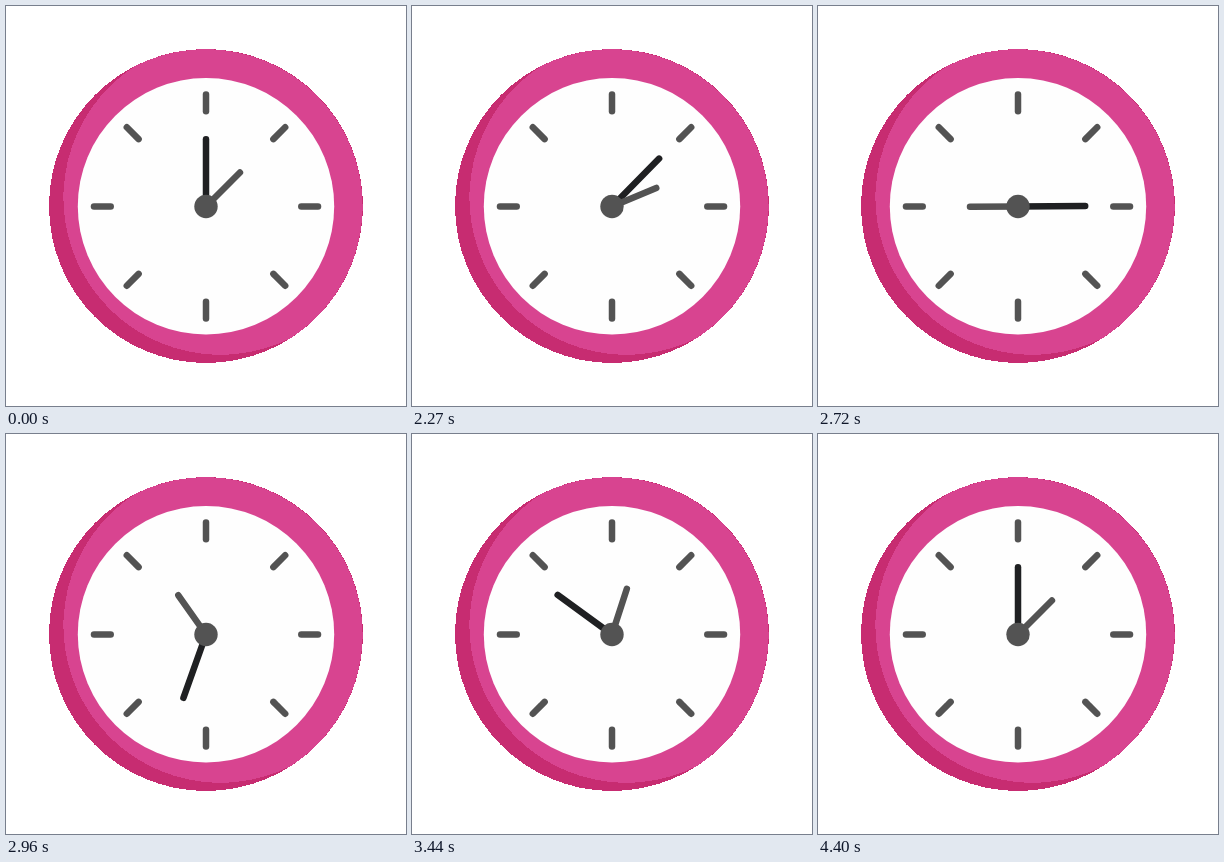
An HTML page that plays this animation: 400 by 400 pixels, repeating every 4.43 s.

```html
<!DOCTYPE html>
<html lang="en">
<head>
<meta charset="utf-8">
<title>Clock</title>
<style>
  html, body { margin: 0; width: 100%; height: 100%; overflow: hidden; background: #fff; }
  svg { display: block; width: 100%; height: 100%; }
  .bar { stroke-width: 6.5; stroke-linecap: round; }
</style>
</head>
<body>
<svg viewBox="0 0 400 400">
  <g shape-rendering="crispEdges">
    <circle cx="200" cy="200" r="157" fill="#c72c71"/>
    <path d="M129.2 59.9A157 157 0 0 1 284.8 332.1A157 157 0 0 1 129.2 59.9Z" fill="#d84490"/>
  </g>
  <circle cx="200" cy="200.3" r="128.2" fill="#fefefe"/>
  <g transform="translate(200 200.5)">
    <g id="ticks" class="bar" stroke="#535353"></g>
    <line id="minute" class="bar" y2="-67.2" stroke="#1f2022"/>
    <line id="hour" class="bar" y2="-48" stroke="#535353"/>
    <circle r="11.7" fill="#535353"/>
  </g>
</svg>
<script>
const LOOP = 4430, HOLD = 2030, STEP = 30, STEPS = 80;
const byId = id => document.getElementById(id);
const rotate = (node, deg) => node.setAttribute('transform', `rotate(${deg})`);

for (let deg = 0; deg < 360; deg += 45) {
  const tick = document.createElementNS('http://www.w3.org/2000/svg', 'line');
  tick.setAttribute('y1', -112);
  tick.setAttribute('y2', -95.3);
  rotate(tick, deg);
  byId('ticks').append(tick);
}

// cubic-bezier(1/3, 0, 0, 1), solved by bisection
function ease(x) {
  if (x <= 0 || x >= 1) return x <= 0 ? 0 : 1;
  let lo = 0, hi = 1;
  for (let i = 0; i < 30; i++) {
    const s = (lo + hi) / 2;
    if (s * (1 - s) ** 2 + s ** 3 < x) lo = s;
    else hi = s;
  }
  return lo * lo * (3 - 2 * lo);
}

function draw(time) {
  const step = Math.floor((time % LOOP - HOLD) / STEP) + 1;
  const turn = 360 * ease(step / STEPS);
  rotate(byId('minute'), 2 * turn);
  rotate(byId('hour'), 45 + turn);
}

let start;
function frame(now) {
  start ??= now;
  draw(now - start);
  requestAnimationFrame(frame);
}
draw(0);
requestAnimationFrame(frame);
</script>
</body>
</html>
```
